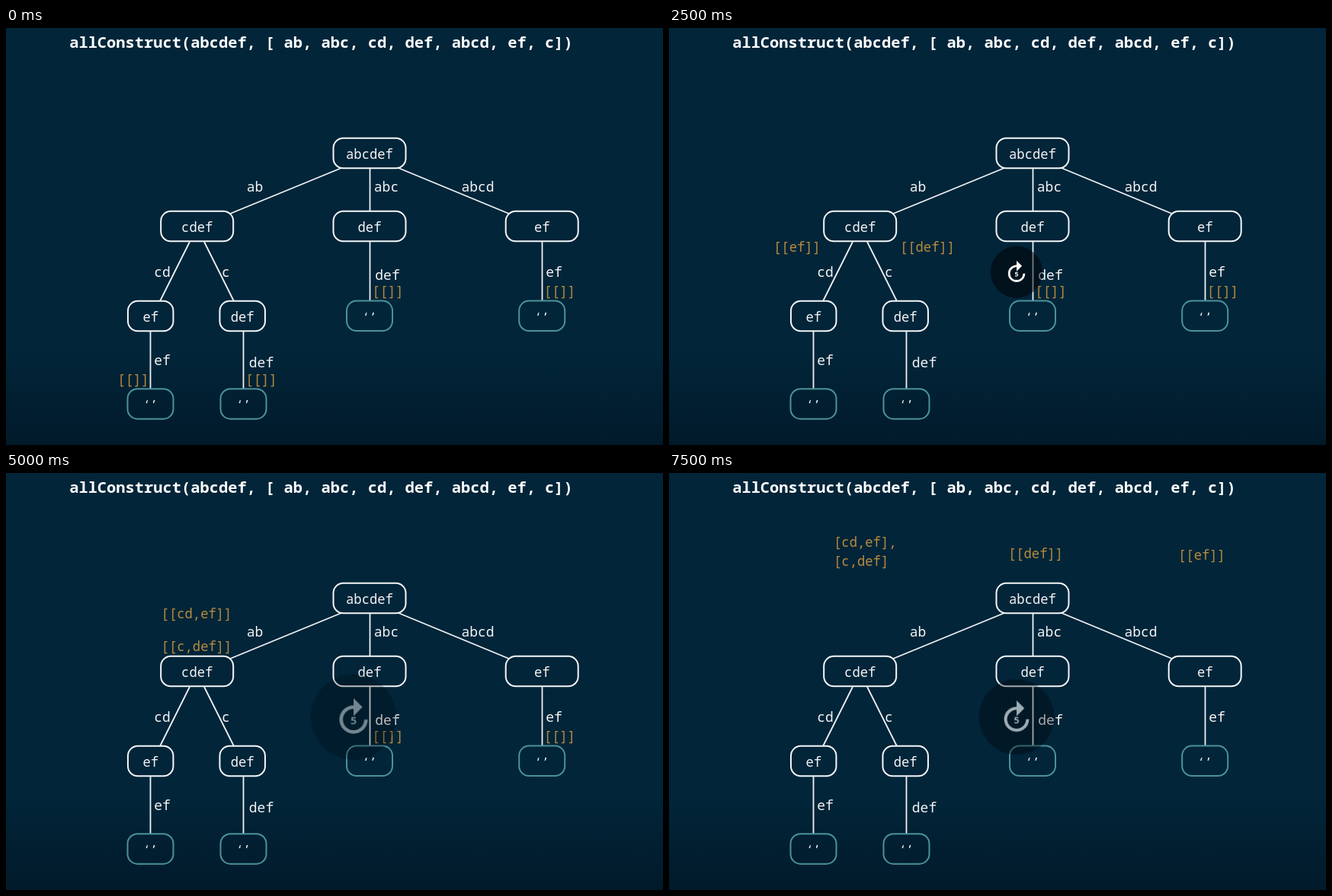
These frames come from a looping animation (862x548 px, 8 s). An HTML page:

```html
<!DOCTYPE html>
<html lang="en">
<head>
<meta charset="utf-8">
<title>Construct tree</title>
<style>
  html, body { margin: 0; width: 100%; height: 100%; overflow: hidden; background: #022539; }
  svg { display: block; width: 862px; height: 548px; }
  text { font-family: "Noto Sans Mono", "DejaVu Sans Mono", monospace; text-anchor: middle; fill: #f1f4f6; }
  .title { font-size: 20.4px; font-weight: 700; fill: #fff; }
  .name { font-size: 17.2px; }
  .edge { font-size: 18px; }
  .empty { font-size: 16px; font-weight: 500; }
  .list text { font-size: 17.2px; fill: #b78b3e; }
  .list .start { text-anchor: start; }
  .lines { stroke: #eef2f4; stroke-width: 1.8; fill: none; }
  rect.node { fill: none; stroke: #f4f7f8; stroke-width: 2; }
  rect.done { stroke: #4b929c; }

  /* Every step is a hard cut on a half-second grid (6.25%). */
  .list, .skip { animation: 8s step-end infinite; }
  .list { opacity: 0; }
  #leaves { animation-name: leaves; }
  #sides { animation-name: sides; }
  #raised { animation-name: raised; }
  #children { animation-name: children; }
  #merged { animation-name: merged; }
  #gathered { animation-name: gathered; }
  #returned { animation-name: returned; }
  @keyframes leaves { 0% { opacity: 1 } 18.75%, 100% { opacity: 0 } }
  @keyframes sides { 0% { opacity: 0 } 18.75% { opacity: .85 } 25% { opacity: 1 } 31.25%, 100% { opacity: 0 } }
  @keyframes raised { 0% { opacity: 0 } 31.25% { opacity: 1 } 43.75%, 100% { opacity: 0 } }
  @keyframes merged { 0% { opacity: 0 } 43.75% { opacity: 1 } 75%, 100% { opacity: 0 } }
  @keyframes gathered { 0% { opacity: 0 } 75% { opacity: 1 } 93.75%, 100% { opacity: 0 } }
  @keyframes children { 0% { opacity: 1 } 93.75%, 100% { opacity: 0 } }
  @keyframes returned { 0% { opacity: 0 } 93.75%, 100% { opacity: 1 } }

  /* The skip badge grows and fades after each press. */
  .skip { animation-name: skip; opacity: 0; }
  .skip text { font: 700 6px "Open Sans", sans-serif; fill: #fff; }
  @keyframes skip {
    0%, 12.5%, 25%, 37.5%, 56.25%, 68.75%, 81.25% { opacity: 0; transform: scale(1); }
    6.25% { opacity: .76; transform: scale(1.3); }
    18.75% { opacity: 1; transform: scale(1); }
    31.25% { opacity: .98; transform: scale(1.03); }
    50% { opacity: .47; transform: scale(1.67); }
    62.5% { opacity: .45; transform: scale(1.7); }
    75% { opacity: .4; transform: scale(1.76); }
    87.5% { opacity: .42; transform: scale(1.73); }
    93.75%, 100% { opacity: .62; transform: scale(1.5); }
  }
</style>
</head>
<body>
<svg viewBox="0 0 862 548">
  <defs>
    <linearGradient id="shade" x1="0" y1="0" x2="0" y2="1">
      <stop offset="0" stop-color="#022539"/>
      <stop offset=".78" stop-color="#022539"/>
      <stop offset="1" stop-color="#011a2a"/>
    </linearGradient>
  </defs>
  <rect width="862" height="548" fill="url(#shade)"/>
  <text class="title" x="413.5" y="26">allConstruct(abcdef, [ ab, abc, cd, def, abcd, ef, c])</text>

  <path class="lines" d="M440 184L294 244M477.5 184V240M515 184L660 244M241 281L202 359M260 281L299 359
    M477.5 281V358M703.5 281V358M189.5 398V474M311.5 398V474"/>
  <g id="tree"></g>

  <g class="edge-labels">
    <text class="edge" x="326.5" y="215">ab</text>
    <text class="edge" x="499" y="215">abc</text>
    <text class="edge" x="619" y="215">abcd</text>
    <text class="edge" x="205" y="327">cd</text>
    <text class="edge" x="288.5" y="327">c</text>
    <text class="edge" x="500.5" y="331">def</text>
    <text class="edge" x="719" y="327">ef</text>
    <text class="edge" x="205" y="443">ef</text>
    <text class="edge" x="335" y="446">def</text>
  </g>

  <g class="list" id="leaves">
    <text x="167" y="468">[[]]</text>
    <text x="335" y="468">[[]]</text>
  </g>
  <g class="list" id="sides">
    <text x="168" y="347">[[ef]]</text>
    <text x="345" y="347">[[def]]</text>
  </g>
  <g class="list" id="raised">
    <text x="168" y="294">[[ef]]</text>
    <text x="339" y="294">[[def]]</text>
  </g>
  <g class="list" id="merged">
    <text x="250" y="191">[[cd,ef]]</text>
    <text x="250" y="234">[[c,def]]</text>
  </g>
  <g class="list" id="gathered">
    <text class="start" x="201" y="153">[</text>
    <text class="start" x="216" y="179">[cd,ef],</text>
    <text class="start" x="216" y="204.5">[c,def]</text>
    <text class="start" x="202" y="229">]</text>
  </g>
  <g class="list" id="children">
    <text x="501" y="352">[[]]</text>
    <text x="726.5" y="352">[[]]</text>
  </g>
  <g class="list" id="returned">
    <text class="start" x="216" y="97">[cd,ef],</text>
    <text class="start" x="216" y="122">[c,def]</text>
    <text x="481" y="112">[[def]]</text>
    <text x="699" y="114">[[ef]]</text>
  </g>

  <g transform="translate(456 320.7)">
    <g class="skip">
      <circle r="33" fill="#000" fill-opacity=".5"/>
      <g transform="scale(1.37) translate(-12 -11.6)">
        <path fill="#fff" d="M4 13a8 8 0 0 0 16 0h-2a6 6 0 1 1-6-6v4l5-5-5-5v4a8 8 0 0 0-8 8z"/>
        <text x="12" y="15.6">5</text>
      </g>
    </g>
  </g>
</svg>
<script>
  const tree = document.getElementById("tree");

  function add(tag, attrs, label = "") {
    const el = document.createElementNS(tree.namespaceURI, tag);
    for (const key in attrs) el.setAttribute(key, attrs[key]);
    el.textContent = label;
    tree.append(el);
  }

  function node(cx, top, width, label) {
    const empty = !label;
    add("rect", {
      class: empty ? "node done" : "node",
      x: cx - width / 2, y: top, width, height: 39.5, rx: 13
    });
    add("text", {
      class: empty ? "empty" : "name",
      x: cx, y: top + 27
    }, label || "\u2018\u2019");
  }

  node(477, 144.8, 95, "abcdef");
  node(250.7, 240.8, 95, "cdef");
  node(477, 240.8, 95, "def");
  node(703.2, 240.8, 95, "ef");
  node(189.7, 358.8, 59.5, "ef");
  node(310.2, 358.8, 59.5, "def");
  node(477, 358.6, 60);
  node(703.2, 358.6, 60);
  node(189.5, 474.2, 60);
  node(311.5, 474.2, 60);
</script>
</body>
</html>
```
